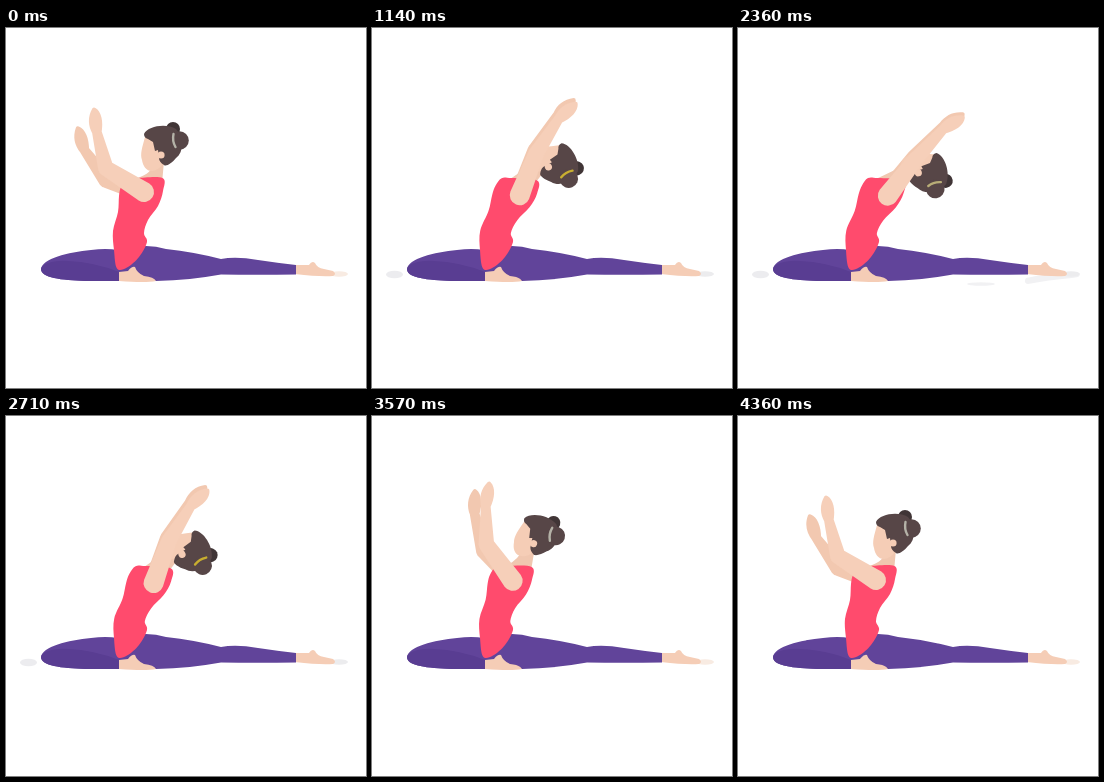
Animation of 360 by 360 pixels, one loop 4.43 s. Source, as an HTML page:

```html
<!DOCTYPE html>
<html lang="en">
<head>
<meta charset="utf-8">
<title>Yoga stretch</title>
<style>
html, body { margin: 0; width: 100%; height: 100%; overflow: hidden; background: #fff; }
svg { display: block; width: 100vw; height: 100vh; }
</style>
</head>
<body>
<svg viewBox="0 0 360 360">
  <g fill="#ececef">
    <ellipse id="shadeLeft" cx="22.5" cy="246.500" rx="8.5" ry="3.8"/>
    <g id="shadeLow">
      <ellipse cx="243" cy="256" rx="14" ry="1.8"/>
      <path d="M288 250Q312 245 341 246Q344 249 334 250Q310 252 290 256Q285 255 288 250Z"/>
    </g>
  </g>
  <ellipse id="toeShade" cx="333" cy="246" rx="9" ry="2.8"/>

  <path fill="#f5cdb6" d="M289 237L303 237Q306 232 309 235Q311 240 318 241L327 243Q331 246 327 248Q314 249 289 246Z"/>
  <path fill="#61449a" d="M35 241C36 231 62 224 85 222Q100 220 112 222L140 218Q150 218 160 221Q188 224 215 231Q230 228 252 232Q272 235 290 237L290 246.500Q250 247 215 246.500Q185 252 150 253L80 253C55 252 35 250 35 241Z"/>
  <path fill="#593d92" d="M35 241C36 236 46 232 62 233Q88 234 113 244L113 253L80 253C55 252 35 250 35 241Z"/>
  <path fill="#f5cdb6" d="M113 253L113 244L122 243Q126 238 129 239Q131 245 138 248Q148 249 150 253Q140 255 113 253Z"/>

  <path id="farArm" fill="#f2c8b0"/>
  <path id="neck" fill="#f0c7b0"/>
  <g id="head">
    <circle cx="11" cy="-17" r="7" fill="#403536"/>
    <path fill="#f5cdb6" d="M-17-9C-20 2-22 8-20 14C-19 20-16 25-10 25C-2 24 3 18 2 8L0-10Z"/>
    <path fill="#574647" d="M-18-12C-14-20 4-23 14-17C22-8 22 6 14 12C10 17 4 21 2 19Q-3 16-3 12L-4 4L-7 5L-9-4L-14-7Q-18-8-18-12Z"/>
    <circle cx="-1" cy="9" r="3.6" fill="#f5cdb6"/>
    <circle cx="17.5" cy="-5.5" r="9.3" fill="#574647"/>
    <path id="tie" d="M11.5-12Q10-5 13.500 1" fill="none" stroke-width="2.4" stroke-linecap="round"/>
  </g>
  <path id="torso" fill="#ff4b6d"/>
  <path id="nearArm" fill="#f6cfb9"/>
</svg>
<script>
const LOOP = 4430, REST = 1640, RETURN = 2290, TICK = 71.35;
const $ = id => document.getElementById(id);
const clamp = (v, lo = 0, hi = 1) => Math.min(hi, Math.max(lo, v));
const mix = (a, b, p) => a + (b - a) * p;
const xy = pt => pt.map(v => v.toFixed(2)).join(" ");

// Upright torso outline, clockwise from the left collar
const collar = [[131, 150], [156.5, 150]];
const outline = [
  ...collar, [157, 163], [152, 178], [142, 192], [138, 205], [141, 214],
  [133, 229], [121, 239.5], [111, 240.5],
  [108, 222], [107, 203], [112, 184], [113, 168], [115, 159], [121, 151]
];

// Leaning back shifts the body more the higher it is above the hips
function sway([x, y], p) {
  const k = Math.sin(p * Math.PI / 2) * clamp((210 - y) / 50);
  return [x + 9 * k, y + (x - 130) * 0.1 * k];
}

// A point at a distance from another; 0 degrees is straight up
function reach([x, y], deg, len) {
  const a = deg * Math.PI / 180;
  return [x + len * Math.sin(a), y - len * Math.cos(a)];
}

// Closed smooth outline
function blob(pts) {
  const n = pts.length, get = i => pts[(i + n) % n];
  let d = "M" + xy(pts[0]);
  for (let i = 0; i < n; i++) {
    const [a, b, c, e] = [-1, 0, 1, 2].map(k => get(i + k));
    d += "C" + xy(b.map((v, k) => v + (c[k] - a[k]) / 6))
      + " " + xy(c.map((v, k) => v - (e[k] - b[k]) / 6)) + " " + xy(c);
  }
  return d + "Z";
}

// Tapered segment with round ends
function taper(a, ra, b, rb) {
  const dir = Math.atan2(b[1] - a[1], b[0] - a[0]);
  const side = (c, r, s) => xy([c[0] - s * Math.sin(dir) * r, c[1] + s * Math.cos(dir) * r]);
  return `M${side(a, ra, 1)}A${ra} ${ra} 0 0 1 ${side(a, ra, -1)}`
    + `L${side(b, rb, -1)}A${rb} ${rb} 0 0 1 ${side(b, rb, 1)}Z`;
}

function hand(wrist, deg) {
  const to = (f, w) => xy(reach(reach(wrist, deg, 25 * f), deg + 90, w));
  return `M${to(-0.05, -4.5)}C${to(0.3, -8)} ${to(0.65, -7.5)} ${to(0.97, -1.5)}`
    + `Q${to(1.03, 0)} ${to(0.97, 1.5)}C${to(0.8, 7)} ${to(0.4, 8)} ${to(-0.05, 4.5)}Z`;
}

// Each joint turns steadily; lag holds the far arm behind until the arms meet
function arm(shoulder, p, lag) {
  const elbow = reach(shoulder, mix(-58, 40, p) - 14 * lag, 45);
  const wrist = reach(elbow, mix(-14, 44, p) - 22 * lag * lag, mix(37, 42, p));
  return taper(shoulder, 10, elbow, 7.8) + taper(elbow, 7.8, wrist, 4.8)
    + hand(wrist, mix(-7, 61, p) - 10 * lag);
}

function draw(p) {
  const turn = 84 * p, arc = p * (1 - p);
  const head = [mix(156, 190, p) + 10 * arc, mix(118, 146, p) - 28 * arc];
  const onHead = (x, y) => reach(reach(head, turn + 90, x), turn + 180, y);
  const [l, r] = collar.map(c => sway(c, p));
  const shoulder = [mix(138, 150, p), mix(164, 168, p)];
  const lag = 1 - p;

  $("head").setAttribute("transform", `translate(${xy(head)}) rotate(${turn.toFixed(2)})`);
  $("neck").setAttribute("d", `M${xy(l)}Q${xy(onHead(-9, 27))} ${xy(onHead(-10, 18))}`
    + `L${xy(onHead(2, 15))}L${xy(r)}L${xy([r[0] - 3, r[1] + 5])}L${xy([l[0], l[1] + 5])}Z`);
  $("torso").setAttribute("d", blob(outline.map(c => sway(c, p))));
  $("nearArm").setAttribute("d", arm(shoulder, p, 0));
  $("farArm").setAttribute("d", arm([shoulder[0] + 5 * lag, shoulder[1] + 2 - 5 * p], p, lag));

  const gold = clamp(1 - Math.abs(p - 0.8) / 0.3);
  $("tie").setAttribute("stroke", `hsl(50 ${8 + 55 * gold}% ${68 - 20 * gold}%)`);

  const grey = clamp((p - 0.25) / 0.1);
  $("shadeLeft").setAttribute("opacity", grey);
  $("shadeLow").setAttribute("opacity", clamp((p - 0.9) / 0.1));
  $("toeShade").setAttribute("fill", grey > 0.5 ? "#ececee" : "#f8ebe2");
}

// Ease in and out; a power below 1 gives a quicker start
const ease = (s, power) => (1 - Math.cos(Math.PI * clamp(s) ** power)) / 2;
const steps = ms => Math.floor(ms / TICK + 0.3);

// The motion advances in even steps, rests, then returns more slowly
function stretch(t) {
  if (t < RETURN) return ease(steps(t) * TICK / REST, 0.93);
  return 1 - ease((steps(t - RETURN) + 1) / 30, 0.83);
}

const start = performance.now();
function tick() {
  draw(stretch((performance.now() - start) % LOOP));
  requestAnimationFrame(tick);
}
tick();
</script>
</body>
</html>
```
